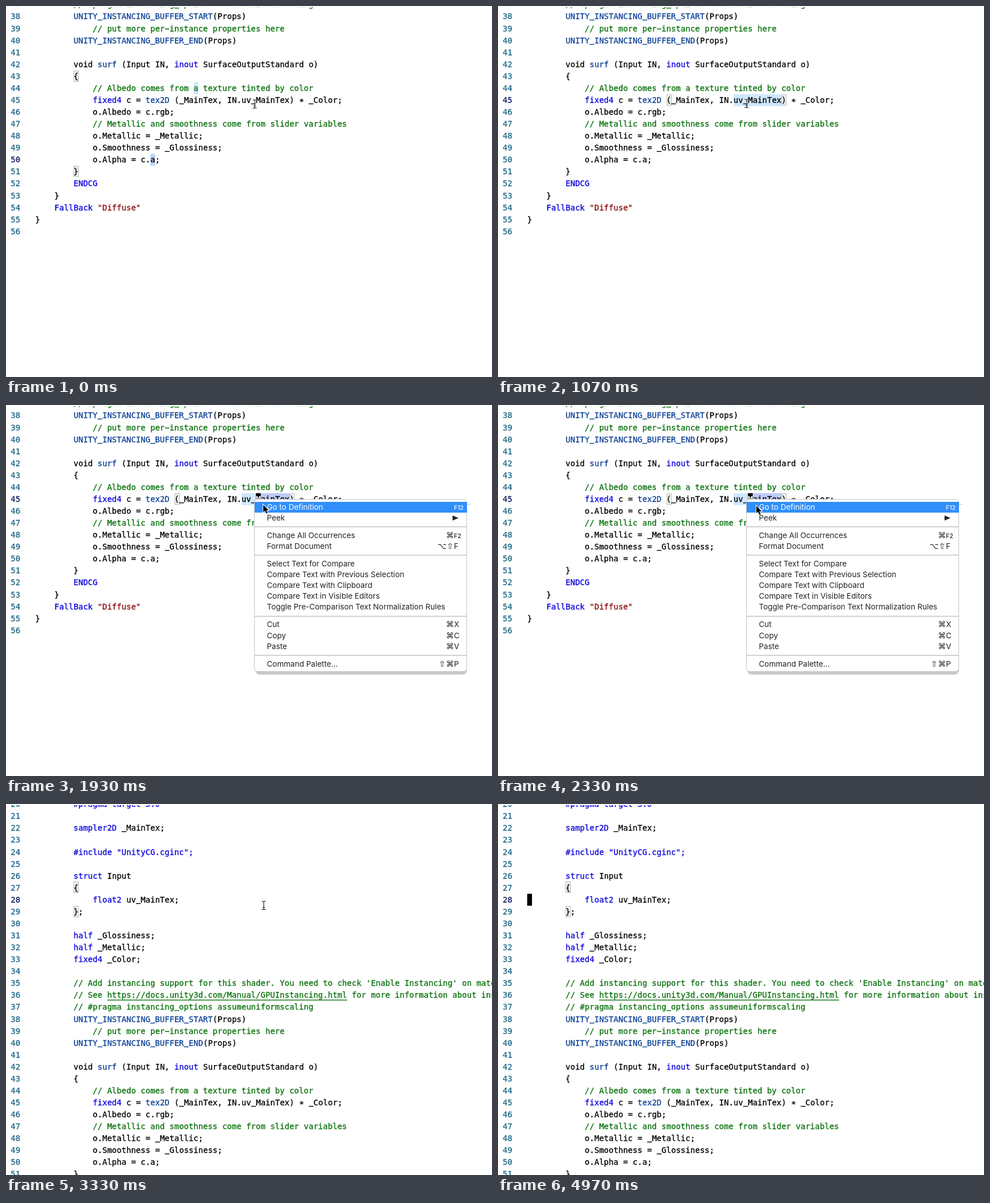
Animation, 856 px wide and 655 px high, one loop 5010 ms. Source, as an HTML page with a canvas:

```html
<!DOCTYPE html>
<html lang="en">
<head>
<meta charset="utf-8">
<title>Go to definition</title>
<style>
  html, body { margin: 0; width: 100%; height: 100%; overflow: hidden; background: #fff; }
  canvas { display: block; }
</style>
</head>
<body>
<canvas id="stage" width="856" height="655"></canvas>
<script>
const ctx = document.getElementById('stage').getContext('2d');
const LOOP = 5010, FIRST = 20, COL = 8.452, ROW = 21.07, LEFT = 51.4;
const MONO = '14.04px "DejaVu Sans Mono", monospace';
const UI = 'Inter, "DejaVu Sans", sans-serif';

// Moments of the interaction, in ms
const CLICK = 400, WORD = 650, MENU = 1180, HOVER = 1260,
      FLASH = [2380, 2430], CLOSE = 2480, JUMP = 2600;

const code = `        #pragma target 3.0

        sampler2D _MainTex;

        #include "UnityCG.cginc";

        struct Input
        {
            float2 uv_MainTex;
        };

        half _Glossiness;
        half _Metallic;
        fixed4 _Color;

        // Add instancing support for this shader. You need to check 'Enable Instancing' on materials that use the shader.
        // See https://docs.unity3d.com/Manual/GPUInstancing.html for more information about instancing.
        // #pragma instancing_options assumeuniformscaling
        UNITY_INSTANCING_BUFFER_START(Props)
            // put more per−instance properties here
        UNITY_INSTANCING_BUFFER_END(Props)

        void surf (Input IN, inout SurfaceOutputStandard o)
        {
            // Albedo comes from a texture tinted by color
            fixed4 c = tex2D (_MainTex, IN.uv_MainTex) ∗ _Color;
            o.Albedo = c.rgb;
            // Metallic and smoothness come from slider variables
            o.Metallic = _Metallic;
            o.Smoothness = _Glossiness;
            o.Alpha = c.a;
        }
        ENDCG
    }
    FallBack "Diffuse"
}
`.split('\n');

const GREEN = '#08700a';
const tokenRule = /\/\/.*|#.*|"[^"]*"|\w+|[^\s\w"]+/g;
const colorRules = [
  [/^\/\//, GREEN],
  [/^(#|(inout|fixed4|ENDCG|FallBack|sampler2D|struct|float2|half)$)/, '#0a00dc'],
  [/^(surf$|tex2D$|UNITY_)/, '#0c4196'],
  [/^"/, '#8a0d0d'],
  [/./, '#000']
];
const tokens = code.map(line => [...line.matchAll(tokenRule)].map(m =>
  [m[0], m.index, colorRules.find(rule => rule[0].test(m[0]))[1]]));

// Menu rows: centre y, label, modifier keys, key
const items = [
  [180.5, 'Go to Definition', '', 'F12'],
  [199.5, 'Peek', '', '▶'],
  [230.5, 'Change All Occurrences', '⌘', 'F2'],
  [249.5, 'Format Document', '⌥⇧', 'F'],
  [280.5, 'Select Text for Compare', '', ''],
  [299.5, 'Compare Text with Previous Selection', '', ''],
  [318.5, 'Compare Text with Clipboard', '', ''],
  [337.5, 'Compare Text in Visible Editors', '', ''],
  [356.5, 'Toggle Pre-Comparison Text Normalization Rules', '', ''],
  [387.5, 'Cut', '⌘', 'X'],
  [407, 'Copy', '⌘', 'C'],
  [426, 'Paste', '⌘', 'V'],
  [457, 'Command Palette…', '⇧⌘', 'P']
];

// Pointer path: time, x, y
const path = [
  [0, 438, 173], [1070, 438, 172], [1230, 438, 172], [1410, 453, 176], [1900, 453, 176],
  [2330, 455, 178], [2600, 454, 179], [3800, 454, 179], [4130, 460, 155], [4450, 468, -20], [LOOP, 468, -20]
];

let scroll = 0;
const rowTop = n => 158.5 + (n - 28) * ROW - scroll;
const colX = c => LEFT + c * COL;

function rect(x, y, w, h, color) {
  ctx.fillStyle = color;
  ctx.fillRect(x, y, w, h);
}

function text(str, x, y, color, font, align = 'left') {
  ctx.font = font;
  ctx.fillStyle = color;
  ctx.textAlign = align;
  ctx.fillText(str, x, y);
}

const mark = (n, c, len, color) => rect(colX(c), rowTop(n), len * COL, ROW, color);

// Slightly heavy type, with underscores close to the baseline
function codeText(str, n, x, color) {
  const y = Math.round(rowTop(n) + 15.3), plain = str.replaceAll('_', ' ');
  text(plain, x, y, color, MONO);
  ctx.strokeStyle = color;
  ctx.lineWidth = .3;
  ctx.strokeText(plain, x, y);
  [...str].forEach((ch, i) => {
    if (ch === '_') rect(x + i * COL, y + 1, COL, 1.4, color);
  });
}

function bracket(n, c) {
  const x = Math.round(colX(c)) + .5, y = Math.round(rowTop(n)) + .5;
  rect(x, y, 8, 19, '#edf3ec');
  ctx.strokeStyle = '#b9bcb8';
  ctx.lineWidth = 1;
  ctx.strokeRect(x, y, 8, 19);
}

function caret(n, c) {
  mark(n, c, 1, '#000');
  codeText((code[n - FIRST][c] || ' '), n, colX(c), '#fff');
}

function drawCode(active) {
  tokens.forEach((line, i) => {
    const n = FIRST + i;
    codeText(String(n), n, 8.3, n === active ? '#0b1a5c' : '#1b6684');
    for (const [str, c, color] of line) codeText(str, n, colX(c), color);
  });
  rect(colX(15), rowTop(36) + 18.4, 50 * COL, 1.4, GREEN);
}

function drawMenu(t) {
  ctx.fillStyle = '#c9c9c9';
  ctx.beginPath();
  ctx.roundRect(439, 172, 373, 304, 8);
  ctx.fill();
  rect(811, 175, 8, 1, '#c8c8c8');
  ctx.fillStyle = '#fff';
  ctx.strokeStyle = '#c4c4c4';
  ctx.lineWidth = 1;
  ctx.beginPath();
  ctx.roundRect(437.5, 166.5, 374, 304, 6);
  ctx.fill();
  ctx.stroke();
  for (const y of [214, 264, 372, 441]) rect(438, y, 373, 2, '#d2d2d2');

  const hot = t >= HOVER && !(t >= FLASH[0] && t < FLASH[1]);
  if (hot) rect(438, 171, 374, 19, '#318ffb');
  items.forEach(([mid, label, mods, key], i) => {
    const color = hot && i === 0 ? '#fff' : '#222', y = Math.round(mid + 4.6);
    text(label, 459.5, y, color, '13.5px ' + UI);
    [...mods].reverse().forEach((m, k) =>
      text(m, 782 - k * 14, y, color, '14px "DejaVu Sans", sans-serif', 'center'));
    if (key === '▶') {
      ctx.beginPath();
      ctx.moveTo(786.5, mid - 4.5);
      ctx.lineTo(797, mid);
      ctx.lineTo(786.5, mid + 4.5);
      ctx.fill();
    } else {
      const small = key.length > 1;
      text(key, 789, y, color, (small ? '500 10.5px ' : '13.5px ') + UI);
    }
  });
}

function polyline(points, x, y) {
  ctx.beginPath();
  points.forEach(([px, py]) => ctx.lineTo(x + px, y + py));
}

function drawArrow(x, y) {
  polyline([[0, 0], [0, 13], [3, 10.4], [5.3, 15.7], [7.6, 14.7], [5.4, 9.6], [9.3, 9.4]], x, y);
  ctx.closePath();
  ctx.lineWidth = 2;
  ctx.strokeStyle = '#fff';
  ctx.stroke();
  ctx.fillStyle = '#000';
  ctx.fill();
}

function drawBeam(x, y) {
  ctx.beginPath();
  for (const s of [-1, 1]) {
    ctx.moveTo(x - 3.5, y + s * 7.5);
    ctx.quadraticCurveTo(x, y + s * 7.5, x, y + s * 6);
    ctx.quadraticCurveTo(x, y + s * 7.5, x + 3.5, y + s * 7.5);
  }
  ctx.moveTo(x, y - 6);
  ctx.lineTo(x, y + 6);
  ctx.moveTo(x - 2, y + 3.5);
  ctx.lineTo(x + 2, y + 3.5);
  ctx.lineWidth = 2.6;
  ctx.strokeStyle = 'rgba(255,255,255,.6)';
  ctx.stroke();
  ctx.lineWidth = 1.1;
  ctx.strokeStyle = '#111';
  ctx.stroke();
}

function pointerAt(t) {
  const i = path.findIndex(p => p[0] > t);
  const [t0, x0, y0] = path[i - 1], [t1, x1, y1] = path[i];
  const k = (t - t0) / (t1 - t0);
  return [x0 + (x1 - x0) * k, y0 + (y1 - y0) * k];
}

function draw(t) {
  const jumped = t >= JUMP, clicked = t >= CLICK, menuOpen = t >= MENU && t < CLOSE;
  const blink = since => Math.floor((t - since) / 500) % 2 === 0;
  scroll = jumped ? 0 : 361;
  rect(0, 0, 856, 655, '#fff');

  if (jumped) {
    if (t < JUMP + 350) mark(28, 0, 30, '#ffcc99');
  } else if (clicked) {
    if (t >= WORD) mark(45, 43, 10, '#cfe8fd');
    if (t >= MENU) mark(45, 46, 7, '#bfcbf7');
  } else {
    mark(44, 33, 1, '#cfe8fd');
    mark(50, 24, 1, '#bcd6fa');
  }

  if (t >= JUMP + 100) {
    bracket(27, 8);
    bracket(29, 8);
  } else if (t >= CLICK + 50) {
    bracket(45, 29);
    bracket(45, 53);
  } else {
    bracket(43, 8);
    bracket(51, 8);
  }

  drawCode(jumped ? 28 : clicked ? 45 : 50);

  if (jumped) {
    if (blink(JUMP)) caret(28, 0);
  } else if (clicked) {
    if (t >= MENU || blink(CLICK)) caret(45, 46);
  } else if (t >= 250) {
    caret(50, 24);
  }

  rect(0, 0, 856, 2, '#fff');
  if (menuOpen) drawMenu(t);
  (menuOpen ? drawArrow : drawBeam)(...pointerAt(t));
}

const start = performance.now();
function tick() {
  draw((performance.now() - start) % LOOP);
  requestAnimationFrame(tick);
}
tick();
</script>
</body>
</html>
```
